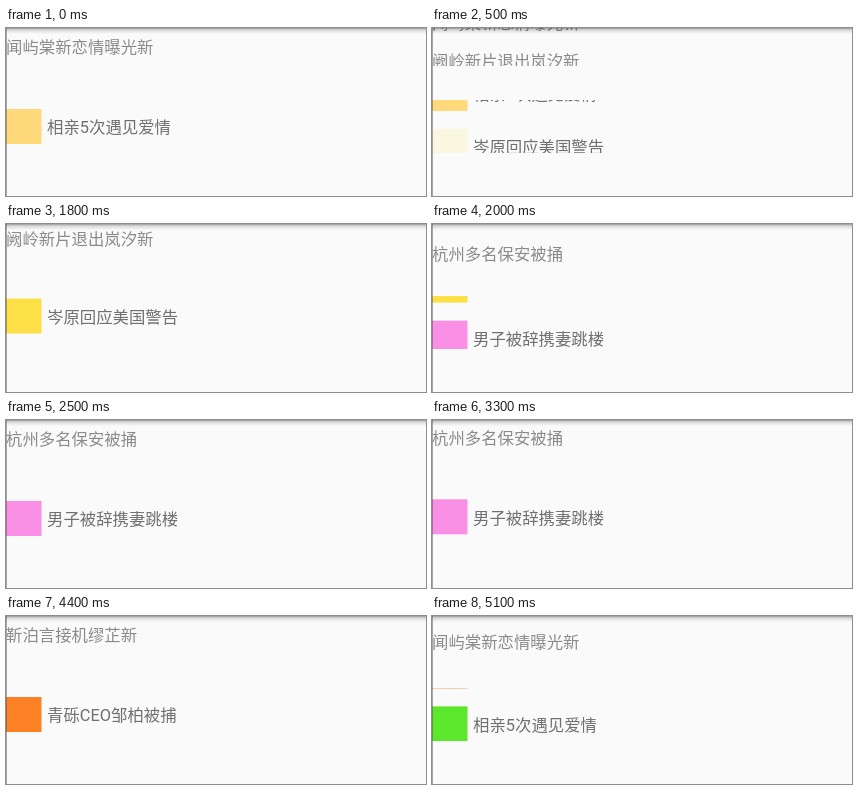
Animation, 420 px wide and 168 px high, one loop 5.2 s. Source, as an HTML page:

```html
<!DOCTYPE html>
<html lang="zh-CN">
<head>
<meta charset="utf-8">
<title>Vertical news ticker</title>
<style>
html, body { margin: 0; width: 100%; height: 100%; overflow: hidden; background: #f9faf9; }
svg { display: block; width: 100vw; height: 100vh; }
text { font: 16.4px Roboto, "Noto Sans CJK SC", "Noto Sans CJK", sans-serif; }
.title { fill: #8b8b8b; }
.news { fill: #707070; }
</style>
</head>
<body>
<svg viewBox="0 0 420 168">
  <defs>
    <linearGradient id="shade" x1="0" y1="0" x2="0" y2="1">
      <stop offset="0" stop-color="#000" stop-opacity=".38"/>
      <stop offset=".35" stop-color="#000" stop-opacity=".13"/>
      <stop offset="1" stop-color="#000" stop-opacity="0"/>
    </linearGradient>
    <clipPath id="topClip"><rect width="420" height="38"/></clipPath>
    <clipPath id="lowClip"><rect y="72" width="420" height="53"/></clipPath>
  </defs>
  <rect width="420" height="168" fill="#f9faf9"/>
  <g id="top" clip-path="url(#topClip)"></g>
  <g id="low" clip-path="url(#lowClip)"></g>
  <rect width="420" height="6" fill="url(#shade)"/>
  <rect width="1" height="168" fill="#555" opacity=".5"/>
</svg>
<script>
const LOOP = 5200, TOP_H = 38, LOW_H = 53;

// The first item comes round again with a new colour.
const items = [
  { title: '闻屿棠新恋情曝光新', news: '相亲5次遇见爱情', color: '#ffd97a' },
  { title: '阙岭新片退出岚汐新', news: '岑原回应美国警告', color: '#fde045' },
  { title: '杭州多名保安被捅', news: '男子被辞携妻跳楼', color: '#fa90e6' },
  { title: '靳泊言接机缪芷新', news: '青砾CEO邹柏被捕', color: '#fc8024' },
  { title: '闻屿棠新恋情曝光新', news: '相亲5次遇见爱情', color: '#5ce62c' }
];
const slides = [
  { start: 211, length: 500 },
  { start: 1690, length: 490 },
  { start: 3244, length: 500 },
  { start: 4690, length: 568 }
];

function add(parent, tag, attrs, content = '') {
  const el = document.createElementNS('http://www.w3.org/2000/svg', tag);
  for (const key in attrs) el.setAttribute(key, attrs[key]);
  el.textContent = content;
  return parent.appendChild(el);
}

const clamp = x => Math.min(1, Math.max(0, x));
const ease = x => (1 - Math.cos(Math.PI * x)) / 2;
const top_ = document.getElementById('top');
const low = document.getElementById('low');

const rows = items.map(({ title, news, color }) => {
  const head = add(top_, 'g', {});
  add(head, 'text', { class: 'title', x: 0, y: 25.2 }, title);
  const body = add(low, 'g', {});
  const box = add(body, 'rect', { y: 81, width: 35.5, height: 35, fill: color });
  add(body, 'text', { class: 'news', x: 41, y: 105.2 }, news);
  return { head, body, box };
});

function draw(t) {
  const pos = slides.reduce((sum, s) => sum + ease(clamp((t - s.start) / s.length)), 0);
  rows.forEach(({ head, body }, i) => {
    const d = i - pos;
    const show = Math.abs(d) < 1 ? 'visible' : 'hidden';
    head.setAttribute('transform', `translate(0 ${d * TOP_H})`);
    body.setAttribute('transform', `translate(0 ${d * LOW_H})`);
    head.setAttribute('visibility', show);
    body.setAttribute('visibility', show);
  });
  // The second swatch enters pale and gains its colour as it settles.
  rows[1].box.setAttribute('fill-opacity', 0.13 + 0.87 * clamp((t - 500) / 200));
}

const begin = performance.now();
function tick() {
  draw((performance.now() - begin) % LOOP);
  requestAnimationFrame(tick);
}
tick();
</script>
</body>
</html>
```
